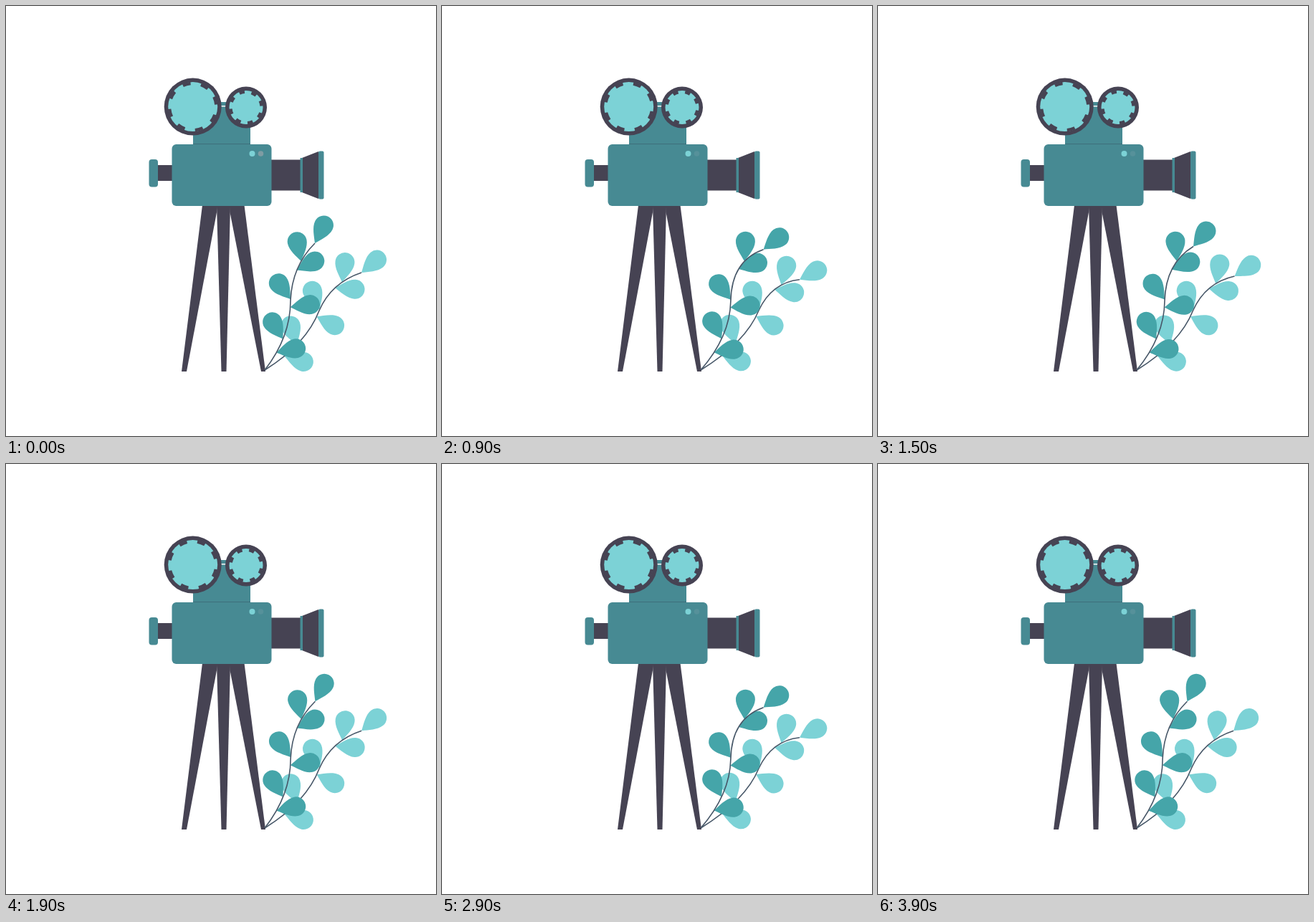
An HTML page with a canvas that plays this animation: 600x600 px, repeating every 4000 ms.

```html
<!DOCTYPE html>
<html lang="en">
<head>
<meta charset="utf-8">
<title>Film camera</title>
<style>
  html, body { margin: 0; width: 100%; height: 100%; overflow: hidden; background: #fff; }
  canvas { display: block; }
</style>
</head>
<body>
<canvas id="stage" width="600" height="600"></canvas>
<script>
const ctx = document.getElementById('stage').getContext('2d');
const LOOP = 4000, STEP = 100, TAU = Math.PI * 2;
const DARK = '#464353', TEAL = '#478a93', LIGHT = '#7cd2d6', LEAF = '#45a5a9', STEM = '#475768';

// Both stems grow from ROOT as two joined quadratic curves: bend, joint, bend, tip.
const ROOT = [361, 508];
const BACK = {
  color: LIGHT, spread: 1.07,
  upright: [[419, 472], [437, 425], [454, 386], [496, 372]],
  leaning: [[424, 469], [442, 425], [460, 386], [499, 382]]
};
const FRONT = {
  color: LEAF, spread: 0.93,
  upright: [[397, 462], [397, 411], [399, 363], [431, 331]],
  leaning: [[402, 461], [403, 412], [404, 355], [449, 340]]
};
// Leaves: place along the stem (0 to 2) and turn from its direction in degrees.
const LEAVES = [[0.26, 52], [0.46, -58], [0.91, 85], [1.02, -43], [1.48, 44], [1.64, -44], [2, -20]];

const mix = (a, b, k) => a + (b - a) * k;
const mixPoint = (p, q, k) => [mix(p[0], q[0], k), mix(p[1], q[1], k)];

function box(color, x, y, w, h, r = 0) {
  ctx.fillStyle = color;
  ctx.beginPath();
  ctx.roundRect(x, y, w, h, r);
  ctx.fill();
}

function disc(color, x, y, r) {
  ctx.fillStyle = color;
  ctx.beginPath();
  ctx.arc(x, y, r, 0, TAU);
  ctx.fill();
}

function poly(color, ...p) {
  ctx.fillStyle = color;
  ctx.beginPath();
  for (let i = 0; i < p.length; i += 2) ctx.lineTo(p[i], p[i + 1]);
  ctx.fill();
}

function reel(x, y, r, angle) {
  const teeth = 8, inner = r - 5.5, depth = 4.5;
  disc(DARK, x, y, r);
  disc(LIGHT, x, y, inner);
  ctx.strokeStyle = DARK;
  ctx.lineWidth = depth;
  for (let i = 0; i < teeth; i++) {
    const a = angle + i * TAU / teeth;
    ctx.beginPath();
    ctx.arc(x, y, inner - depth / 2 + 0.5, a - 0.17, a + 0.17);
    ctx.stroke();
  }
}

function leaf([x, y], angle) {
  const d = 28, r = 13.5;
  ctx.save();
  ctx.translate(x, y);
  ctx.rotate(angle);
  ctx.beginPath();
  ctx.moveTo(0, 0);
  ctx.bezierCurveTo(8, -5, d - 10, -r, d, -r);
  ctx.arc(d, 0, r, -TAU / 4, TAU / 4);
  ctx.bezierCurveTo(d - 10, r, 8, 5, 0, 0);
  ctx.fill();
  ctx.restore();
}

function branch({ color, spread, upright, leaning }, sway) {
  const [bend1, joint, bend2, tip] = upright.map((p, i) => mixPoint(p, leaning[i], sway));
  ctx.fillStyle = color;
  for (const [place, turn] of LEAVES) {
    const [from, bend, to] = place < 1 ? [ROOT, bend1, joint] : [joint, bend2, tip];
    const k = place < 1 ? place : place - 1;
    const a = mixPoint(from, bend, k), b = mixPoint(bend, to, k);
    const heading = Math.atan2(b[1] - a[1], b[0] - a[0]);
    leaf(mixPoint(a, b, k), heading + turn * spread * TAU / 360);
  }
  ctx.strokeStyle = STEM;
  ctx.lineWidth = 1.6;
  ctx.beginPath();
  ctx.moveTo(...ROOT);
  ctx.quadraticCurveTo(...bend1, ...joint);
  ctx.quadraticCurveTo(...bend2, ...tip);
  ctx.stroke();
}

function tripod() {
  poly(DARK, 274, 278, 295, 278, 294, 288, 252, 510, 245, 510);
  poly(DARK, 294, 278, 313, 278, 307.5, 510, 300.5, 510);
  poly(DARK, 312, 278, 332.5, 278, 362, 510, 356, 510, 312.5, 288);
}

function camera(t) {
  const turn = t / LOOP * TAU + 0.52;
  box(TEAL, 261, 134, 80, 60);
  box('#fff', 299, 139, 9, 1.5);
  reel(260.7, 140.6, 40, turn);
  reel(335, 141.5, 29, turn);

  box(DARK, 211, 222, 22, 22);
  box(TEAL, 199.5, 214, 12.5, 38.5, 4);
  box(DARK, 369, 214.5, 42, 43);
  poly(DARK, 413, 212, 436, 203, 436, 269, 413, 260);
  box(TEAL, 410.5, 212, 3.5, 48);
  box(TEAL, 436, 202.5, 7.5, 67, 2);

  box(TEAL, 231.5, 193, 139, 86, 6);
  box('#3e6f7b', 261, 192, 80, 1);
  disc(LIGHT, 343.5, 206, 4);
  disc(t % 1000 < 500 ? '#7f9ca3' : '#56919a', 355.5, 206, 3.8);
}

function draw(now) {
  const t = Math.floor(now % LOOP / STEP) * STEP;
  const sway = (1 - Math.cos(t / 2000 * TAU)) / 2;
  ctx.fillStyle = '#fff';
  ctx.fillRect(0, 0, 600, 600);
  tripod();
  camera(t);
  branch(BACK, sway);
  branch(FRONT, sway);
  requestAnimationFrame(draw);
}
requestAnimationFrame(draw);
</script>
</body>
</html>
```
